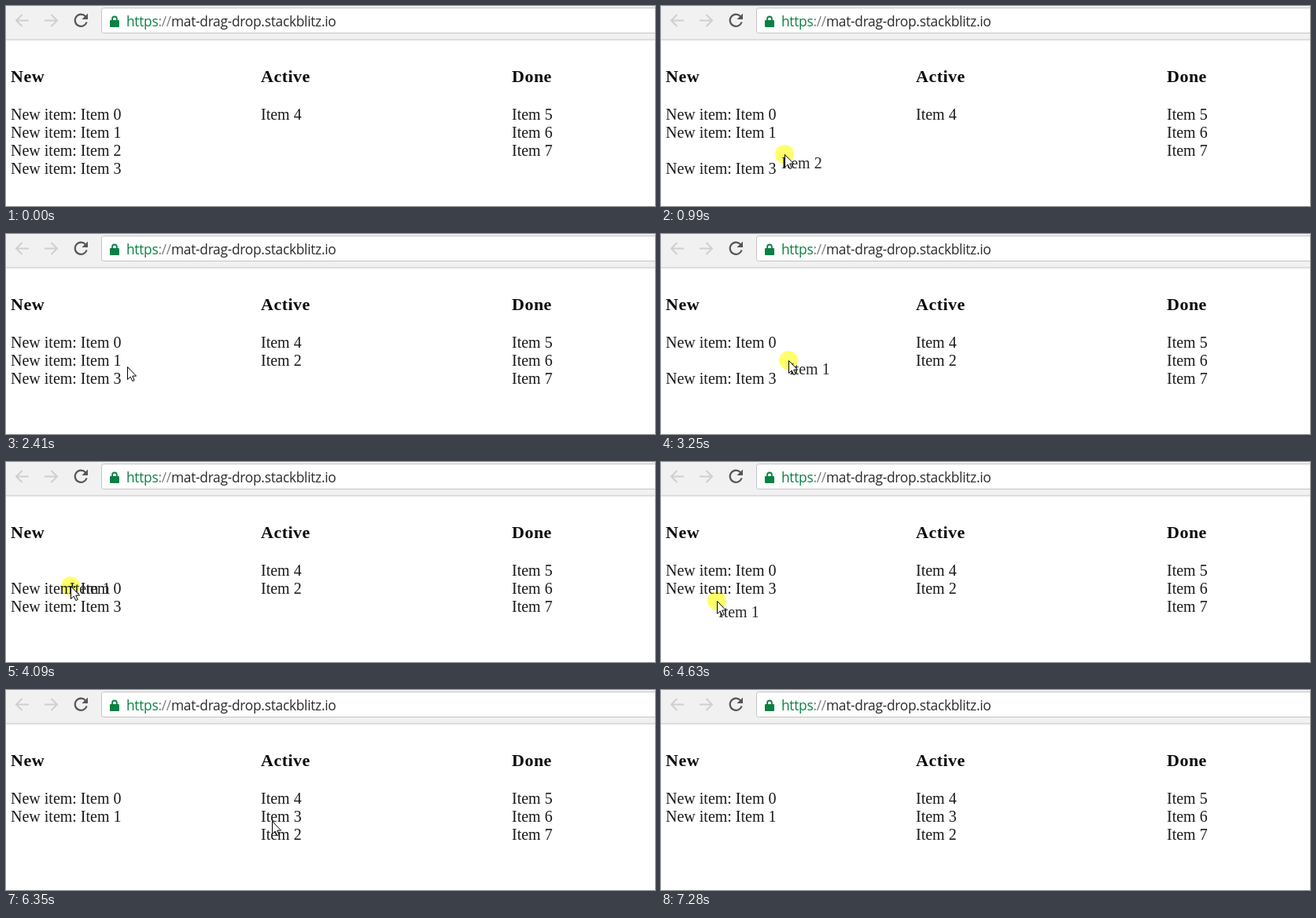
These frames come from a looping animation (825x255 px, 7.51 s). An HTML page:

```html
<!DOCTYPE html>
<html lang="en">
<head>
<meta charset="utf-8">
<title>Drag and drop lists</title>
<style>
  html, body { margin: 0; width: 100%; height: 100%; overflow: hidden; background: #fff; }
  svg { display: block; }
  .page { font: 20px "Liberation Serif", "Times New Roman", serif; fill: #1a1a1a; }
  .page .head { font-weight: bold; font-size: 22px; letter-spacing: .5px; fill: #0a0a0a; }
  .url { font: 17.4px "Open Sans", "Noto Sans", sans-serif; letter-spacing: -.3px; fill: #2b2b2b; }
  #halo { fill: #ffff6b; mix-blend-mode: multiply; }
  #preview { fill: #2a2a2a; }
</style>
</head>
<body>
<svg width="825" height="255" viewBox="0 0 825 255">
  <defs>
    <linearGradient id="edge" x2="0" y2="1">
      <stop stop-color="#d0d0d0"/><stop offset="1" stop-color="#fff"/>
    </linearGradient>
  </defs>
  <rect width="825" height="255" fill="#fff"/>
  <rect width="825" height="42" fill="#f1f1f1"/>
  <rect y="42" width="825" height="3" fill="url(#edge)"/>
  <rect x="121.5" y="2.5" width="720" height="32" rx="3" fill="#fff" stroke="#c3c3c3"/>
  <g fill="none" stroke-width="2">
    <path d="M29 18.5H13.5M20.5 11L13 18.5L20.5 26M49 18.5H64.5M57.5 11L65 18.5L57.5 26" stroke="#cfcfcf"/>
    <path d="M101 13.2A7.6 7.6 0 1 0 102.6 20.5" stroke="#555" stroke-width="2.2"/>
  </g>
  <path d="M104 9.5V17H96.5Z" fill="#555"/>
  <rect x="132" y="18" width="12" height="9" rx="1" fill="#0b8043"/>
  <path d="M135.1 18.5V16.4a2.9 2.9 0 0 1 5.8 0V18.5" fill="none" stroke="#0b8043" stroke-width="1.8"/>
  <text class="url" x="153" y="26"><tspan fill="#0b8043">https</tspan><tspan fill="#808080">://</tspan>mat-drag-drop.stackblitz.io</text>

  <g class="page">
    <text class="head" x="6" y="97">New</text>
    <text class="head" x="324" y="97">Active</text>
    <text class="head" x="643" y="97">Done</text>
    <g id="items"></g>
    <text id="preview"></text>
  </g>
  <circle id="halo" r="12"/>
  <path id="cursor" d="M.5 .5V16.5L4.2 13.1L6.8 18.6L9.2 17.5L6.7 12.1H11.6Z" fill="#fff" stroke="#000" stroke-linejoin="round"/>
</svg>
<script>
const LOOP = 7510, STEP = 77.7, ENTER = 280, LEAVE = 7270;
const COLUMN_X = [6, 324, 643], ACTIVE_EDGE = 318, LIST_TOP = 127.5, ROW = 23;

const linear = u => u;
const speedUp = u => u ** 1.5;
const slowDown = u => 1 - (1 - u) ** 2;
const smooth = u => u * u * (3 - 2 * u);

// Pointer glides, each from where the last one ended: begin, end, x, y, easing
const START = [70, 242];
const glides = [
  [280, 680, 153, 189, slowDown],
  [890, 1445, 208, 184, speedUp],
  [1445, 1765, 382, 154, slowDown],
  [1915, 2420, 152, 169, slowDown],
  [2530, 2920, 163, 161, smooth],
  [3190, 3890, 77, 127, smooth],
  [3940, 4085, 82, 158, slowDown],
  [4085, 4330, 77, 185, smooth],
  [4330, 4600, 70, 176, smooth],
  [4780, 5150, 66, 165, smooth],
  [5640, 6110, 338, 167, smooth],
  [6340, 7035, 766, 216, smooth],
  [7035, 7195, 810, 246, linear]
];

const drags = [
  { item: 2, press: 975, drop: 1925 },
  { item: 1, press: 2530, drop: 4780 },
  { item: 3, press: 5635, drop: 6335 }
];

const $ = id => document.getElementById(id);

function pointerAt(time) {
  let [x, y] = START;
  for (const [begin, end, toX, toY, ease] of glides) {
    if (time <= begin) break;
    const f = ease(Math.min(1, (time - begin) / (end - begin)));
    x += (toX - x) * f;
    y += (toY - y) * f;
  }
  return [x, y];
}

// The dragged item's slot follows the preview, one step behind the pointer
function listsAt(time) {
  const lists = [[0, 1, 2, 3], [4], [5, 6, 7]];
  for (const { item, press, drop } of drags) {
    if (time < press) break;
    for (const list of lists) {
      const i = list.indexOf(item);
      if (i >= 0) list.splice(i, 1);
    }
    const [x, y] = pointerAt(Math.min(time, drop) - STEP);
    const target = lists[x < ACTIVE_EDGE ? 0 : 1];
    const row = Math.max(0, Math.floor((y - LIST_TOP) / ROW));
    target.splice(row, 0, time < drop ? null : item);
  }
  return lists;
}

function column(list, index) {
  const prefix = index ? '' : 'New item: ';
  return list.map((item, row) => item === null ? '' :
    `<text x="${COLUMN_X[index]}" y="${145 + ROW * row}">${prefix}Item ${item}</text>`).join('');
}

function place(el, visible, x, y) {
  el.style.display = visible ? '' : 'none';
  el.setAttribute('transform', `translate(${Math.round(x)} ${Math.round(y)})`);
}

function draw(time) {
  const drag = drags.find(d => time >= d.press && time < d.drop);
  const [x, y] = pointerAt(time), [px, py] = pointerAt(time - STEP);
  $('items').innerHTML = listsAt(time).map(column).join('');
  $('preview').textContent = drag ? `Item ${drag.item}` : '';
  place($('preview'), drag, px, py + 18);
  place($('halo'), drag, x, y);
  place($('cursor'), time >= ENTER && time < LEAVE, x, y);
}

const begin = performance.now();
let shown = null;
function tick() {
  const now = (performance.now() - begin) % LOOP;
  const time = ENTER + STEP * Math.floor((now - ENTER) / STEP);
  if (time !== shown) draw(shown = time);
  requestAnimationFrame(tick);
}
tick();
</script>
</body>
</html>
```
